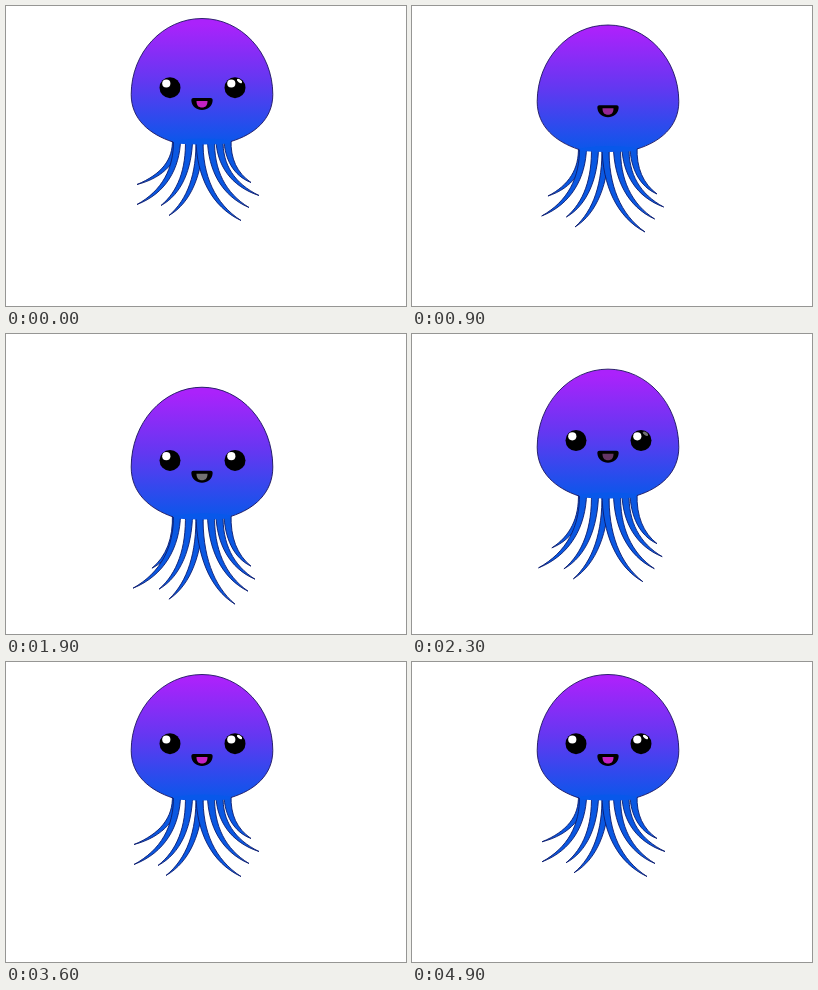
These frames come from a looping animation (400x300 px, 5 s). An HTML page:

```html
<!DOCTYPE html>
<html lang="en">
<head>
<meta charset="utf-8">
<title>Jellyfish</title>
<style>
  html, body { margin: 0; width: 100%; height: 100%; overflow: hidden; background: #fff; }
  svg { display: block; width: 100%; height: 100%; }
</style>
</head>
<body>
<svg viewBox="0 0 400 300">
  <defs>
    <linearGradient id="skin" gradientUnits="userSpaceOnUse" x1="0" y1="0" x2="0" y2="126">
      <stop offset=".04" stop-color="#ab22fb"/>
      <stop offset=".5" stop-color="#6238f1"/>
      <stop offset="1" stop-color="#0858ea"/>
    </linearGradient>
  </defs>
  <g id="arms" fill="#0a58e2" stroke="#0b1c70" stroke-width=".9" stroke-linejoin="round"></g>
  <g id="body">
    <path fill="url(#skin)" stroke="#1c1560" stroke-width=".9"
      d="M167 123.500C144 116 125.200 101 125.200 76C125.200 34 157 0 196 0S266.800 34 266.800 76C266.800 101 248 116 225 123"/>
    <path fill="#0858ea" d="M167 122.500Q196 118 225 122L223 125Q196 127 169 125Z"/>
  </g>
  <g id="face">
    <g id="eyes">
      <circle cx="164" cy="69.200" r="10.500"/>
      <circle cx="229" cy="69.200" r="10.500"/>
      <circle cx="160.300" cy="65" r="4.100" fill="#fff"/>
      <circle cx="225.300" cy="65" r="4.100" fill="#fff"/>
      <ellipse id="glint" cx="233.500" cy="62.500" rx="3" ry="1.500" fill="#fff" transform="rotate(35 233.500 62.500)"/>
    </g>
    <path d="M187.500 79.500H204.500Q207 79.500 206.600 82.500C206 88 201.500 91.500 196 91.500S186 88 185.400 82.500Q185 79.500 187.500 79.500Z"/>
    <path id="tongue" d="M190.500 82.500H201.500C201.500 87 199.500 89 196 89S190.500 87 190.500 82.500Z"/>
  </g>
</svg>
<script>
const LOOP = 5000, STEP = 100, LOW = 1800;
const $ = id => document.getElementById(id);

// resting pose: root x, tip x, tip depth below the crown, sideways drift when low
const arms = [
  [170, 131, 166, 15],
  [171, 131, 186, -4],
  [183, 155, 187, -2],
  [193.5, 163, 197, 0],
  [193.5, 235, 202, -6],
  [205, 243, 189, -1],
  [213.5, 253, 177, -4],
  [221.5, 245, 164, 0]
].map(([root, tip, depth, drift]) => {
  const path = document.createElementNS("http://www.w3.org/2000/svg", "path");
  $("arms").append(path);
  return { root, tip, depth, drift, path, left: tip < 196 };
});

// smooth sink and return: 0 at rest, 1 at the lowest point
function sink(t) {
  const bell = d => 1 / (1 + Math.abs(d / 545) ** 3);
  const rest = bell(LOW);
  return Math.max(0, (bell(t - LOW) - rest) / (1 - rest));
}

// 0 with the eyes gone, 1 with them open
const blink = (t, mid) => Math.min(1, Math.abs(t - mid) / 250);

// tapered arm that hangs down first, then curls out to its tip
function armPath(x, y, tx, ty) {
  const dx = tx - x, dy = ty - y, out = Math.sign(dx);
  const side = s => [
    [x + s * 3.6, y],
    [x + s * 2.8, y + dy * .45],
    [x + dx * .33 + s * 1.9, y + dy * .81 - s * out * 1.5]
  ];
  const [a, b, c] = side(-1), [d, e, f] = side(1);
  return `M${a}C${b} ${c} ${tx},${ty}C${f} ${e} ${d}`;
}

function draw(t) {
  const p = sink(t), bend = p ** .6;
  const top = 12.5 + 41 * p, stretch = 1 + .05 * p;
  const trail = Math.sqrt(Math.max(0, Math.sin(Math.PI * (t - 2000) / 3000)) * (t > 2000));

  $("body").setAttribute("transform", `translate(0 ${top}) scale(1 ${stretch})`);
  $("face").setAttribute("transform", `translate(0 ${top + 4 * p})`);
  for (const { root, tip, depth, drift, path, left } of arms) {
    const lag = left ? trail : 0;
    path.setAttribute("d", armPath(root, top + 121 * stretch,
      tip + drift * bend - 3 * lag, top + depth + 15 * bend + 4 * lag));
  }

  $("eyes").setAttribute("opacity", Math.min(blink(t, 900), blink(t, 3150)));
  $("glint").setAttribute("opacity", 1 - p);
  $("tongue").setAttribute("fill", `hsl(300, ${70 * (1 - p)}%, ${45 - 60 * p * (1 - p)}%)`);
}

const start = performance.now();
function tick(now) {
  const t = Math.max(0, now - start) % LOOP;
  draw(Math.floor(t / STEP) * STEP);
  requestAnimationFrame(tick);
}
draw(0);
requestAnimationFrame(tick);
</script>
</body>
</html>
```
